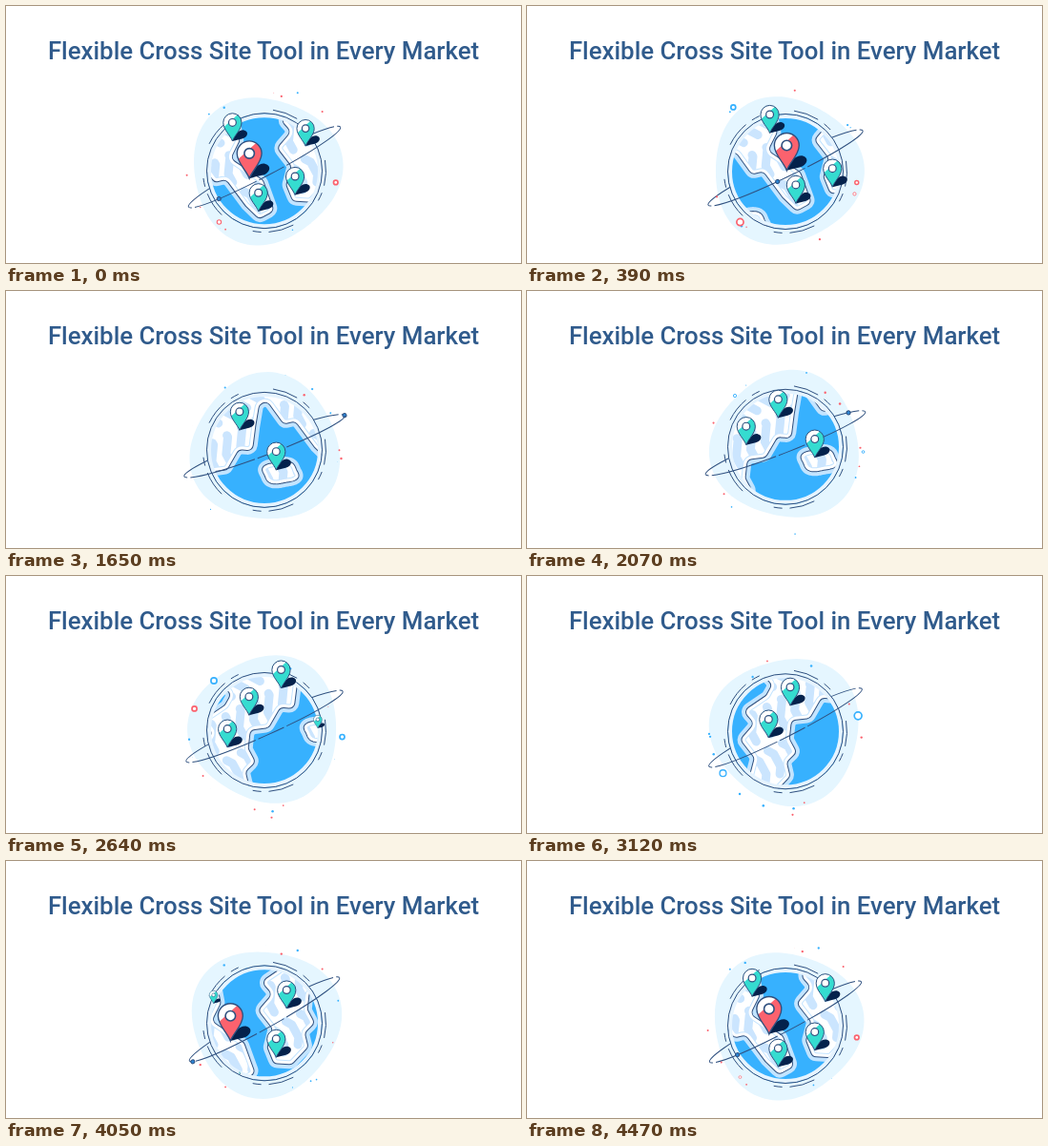
An HTML page with a canvas that plays this animation: 540 by 270 pixels, repeating every 4500 ms.

```html
<!DOCTYPE html>
<html lang="en">
<head>
<meta charset="utf-8">
<title>Globe with branch pins</title>
<style>
  html, body { margin: 0; width: 100%; height: 100%; overflow: hidden; background: #fff; }
  canvas { position: absolute; left: 0; top: 0; width: 540px; height: 270px; }
  h1 {
    position: absolute; left: 0; top: 32px; width: 540px; margin: 0;
    font: 500 25.8px/30px Roboto, sans-serif; color: #305b8c;
    text-align: center; white-space: nowrap;
  }
</style>
</head>
<body>
<canvas></canvas>
<h1>Flexible Cross Site Tool in Every Market</h1>
<script>
const LOOP = 4500, TAU = Math.PI * 2, DEG = TAU / 360;
const CX = 271, R = 60.5, MAP = 225, TILT = 28.3 * DEG;
const NAVY = '#2f507f', DARK = '#04224c', SEA = '#37b1fe', PALE = '#cbe5fe',
      HALO = '#c3e4ff', TEAL = '#35dcd0', RED = '#fb626e', BLOB = '#e5f6ff';

const canvas = document.querySelector('canvas');
const ctx = canvas.getContext('2d');
const dpr = window.devicePixelRatio || 1;
canvas.width = 540 * dpr;
canvas.height = 270 * dpr;

const clamp = v => Math.max(0, Math.min(1, v));
const smooth = v => v * v * (3 - 2 * v);
const wave = (t, peak) => Math.cos(TAU * (t - peak) / LOOP);
const wrap = (v, size) => ((v + size / 2) % size + size) % size - size / 2;

let seed = 7;
function random(min = 0, max = 1) {
  seed = seed * 16807 % 2147483647;
  return min + (max - min) * seed / 2147483647;
}

// Corners of the coast: along the turning direction, then across it.
const coast = [
  [72, -75], [80, -50], [69, -43], [40, -40], [44, -23], [23, -15], [27, 9], [13, 24],
  [11, 42], [27, 52], [51, 44], [55, 29], [69, 25], [69, 9], [80, -7], [98, 0],
  [119, -13], [131, -5], [146, -26], [160, -44], [169, -44], [173, -14], [185, -11],
  [190, 23], [196, 42], [214, 42], [219, 8], [200, -28], [217, -40], [228, -75]
];

// Pin tips on the same map.
const pins = [
  [-15, -43], [50, -2], [86, -21], [129, -30], [-18, 0, 1.35, RED], [143, 25], [16, 38], [-26, 35]
];

function lobedPath(x, y, rx, ry, lobes, depth, turn) {
  const path = new Path2D();
  for (let a = 0; a < TAU; a += 0.05) {
    const k = 1 + depth * Math.cos(lobes * (a - turn));
    path.lineTo(x + rx * k * Math.cos(a), y + ry * k * Math.sin(a));
  }
  path.closePath();
  return path;
}

function roundPath(points, radius) {
  const path = new Path2D(), n = points.length;
  const last = points[n - 1], first = points[0];
  path.moveTo((last[0] + first[0]) / 2, (last[1] + first[1]) / 2);
  points.forEach((p, i) => path.arcTo(...p, ...points[(i + 1) % n], radius));
  path.closePath();
  return path;
}

const mainland = roundPath(coast, 6);
const island = new Path2D();
island.addPath(lobedPath(0, 0, 19, 12, 4, 0.08, 0.5),
  new DOMMatrix().translate(146, 29).rotate(TILT / DEG));

// Pale zigzag roads in even columns.
const roads = new Path2D();
for (let s = 8; s < MAP; s += 17) {
  for (let p = -75, i = 0; p <= 75; p += 15, i++) {
    roads[i ? 'lineTo' : 'moveTo'](s + (i % 4 < 2 ? -5 : 5), p);
  }
}

const particles = Array.from({ length: 65 }, (_, i) => {
  const angle = random(0, TAU), ring = i % 6 === 0;
  return {
    x: CX + random(76, 82) * Math.cos(angle),
    y: 169 + random(70, 86) * Math.sin(angle),
    r: ring ? random(2, 4.5) : random(0.8, 1.3),
    ring,
    color: random() < 0.5 ? RED : SEA,
    peak: random(0, LOOP),
    half: random(350, 600)
  };
});

function paint(fill, stroke, width = 1, path) {
  const shape = path ? [path] : [];
  if (fill) { ctx.fillStyle = fill; ctx.fill(...shape); }
  if (stroke) { ctx.strokeStyle = stroke; ctx.lineWidth = width; ctx.stroke(...shape); }
}

function circle(x, y, r, fill, stroke, width) {
  ctx.beginPath();
  ctx.arc(x, y, r, 0, TAU);
  paint(fill, stroke, width);
}

function drawParticles(t) {
  for (const { x, y, r, ring, color, peak, half } of particles) {
    const age = wrap(t - peak, LOOP);
    const size = smooth(clamp((half - Math.abs(age)) / 200));
    if (!size) continue;
    if (ring) circle(x, y, r * size, '#fff', color, 1.7 * size);
    else circle(x, y - age * 0.006, r * size, color);
  }
}

function drawOrbit(t, cy, front) {
  ctx.save();
  ctx.translate(CX, cy - 4);
  ctx.rotate((4.2 * wave(t, 1650) - 25) * DEG);
  ctx.beginPath();
  ctx.ellipse(0, 0, 90, 9.5, 0, front ? 0 : Math.PI, front ? Math.PI : TAU);
  ctx.setLineDash([70, 3, 30, 3]);
  paint(null, NAVY);
  ctx.setLineDash([]);
  const a = (130 - 360 * t / LOOP) * DEG;
  if (Math.sin(a) > 0 === front) {
    circle(90 * Math.cos(a), 9.5 * Math.sin(a), 2, '#2b86d6', NAVY);
  }
  ctx.restore();
}

function drawLand(land) {
  paint('#fff', HALO, 9, land);
  ctx.save();
  ctx.clip(land);
  ctx.lineCap = ctx.lineJoin = 'round';
  ctx.setLineDash([30, 16]);
  paint(null, PALE, 9, roads);
  ctx.setLineDash([]);
  paint(null, '#fff', 7, land);
  ctx.restore();
  paint(null, NAVY, 1, land);
}

function drawGlobe(cy, shift) {
  ctx.save();
  ctx.translate(CX, cy);
  circle(0, 0, R, SEA);
  ctx.save();
  ctx.clip();
  ctx.rotate(-TILT);
  for (const n of [-2, -1, 0, 1]) {
    ctx.save();
    ctx.translate(shift + n * MAP, 0);
    drawLand(mainland);
    drawLand(island);
    ctx.restore();
  }
  ctx.restore();
  circle(0, 0, R - 2.5, null, '#e6f4ff', 4);
  circle(0, 0, R, null, NAVY);
  for (let a = -10; a < 350; a += 72) {
    for (const [from, size] of [[a, 24], [a + 31, 8]]) {
      ctx.beginPath();
      ctx.arc(0, 0, R + 4, from * DEG, (from + size) * DEG);
      paint(null, NAVY);
    }
  }
  ctx.restore();
}

const pinBody = new Path2D(
  'M0 0C-2 -6 -9.6 -12 -9.6 -19.5A9.6 9.6 0 0 1 9.6 -19.5C9.6 -12 2 -6 0 0Z');
const pinShine = new Path2D('M-12 -12L9 -31H-12Z');
const pinShadow = new Path2D('M0 0C2 -7 7 -12 12 -11.5C18 -10 16 -4 10 -2.5Q5 -1.5 0 0Z');

function drawPin(x, y, scale, color) {
  ctx.save();
  ctx.translate(x, y);
  ctx.scale(scale, scale);
  paint(DARK, null, 0, pinShadow);
  paint(color, null, 0, pinBody);
  ctx.save();
  ctx.clip(pinBody);
  paint('#fff', null, 0, pinShine);
  ctx.restore();
  paint(null, NAVY, 1, pinBody);
  circle(0, -19.5, 3.9, '#fff', NAVY, 1.2);
  ctx.restore();
}

function drawPins(cy, shift) {
  const cos = Math.cos(TILT), sin = Math.sin(TILT);
  for (const [s0, p, size = 1, color = TEAL] of pins) {
    const s = wrap(s0 + shift, MAP);
    const scale = size * clamp((Math.sqrt(R * R - p * p) - Math.abs(s)) / 11);
    if (scale) drawPin(CX + s * cos + p * sin, cy - 0.5 - s * sin + p * cos, scale, color);
  }
}

function frame(now) {
  const t = Math.floor(now % LOOP / 30) * 30;
  const cy = 168 + 6 * wave(t, 390), shift = MAP * t / LOOP;
  ctx.setTransform(dpr, 0, 0, dpr, 0, 0);
  ctx.clearRect(0, 0, 540, 270);
  paint(BLOB, null, 0, lobedPath(CX + 1, cy - 1, 78, 77, 3, 0.05, (120 * t / LOOP - 10) * DEG));
  drawOrbit(t, cy, false);
  drawGlobe(cy, shift);
  drawOrbit(t, cy, true);
  drawParticles(t);
  drawPins(cy, shift);
}

const start = performance.now();
function tick() {
  frame(performance.now() - start);
  requestAnimationFrame(tick);
}
tick();
</script>
</body>
</html>
```
